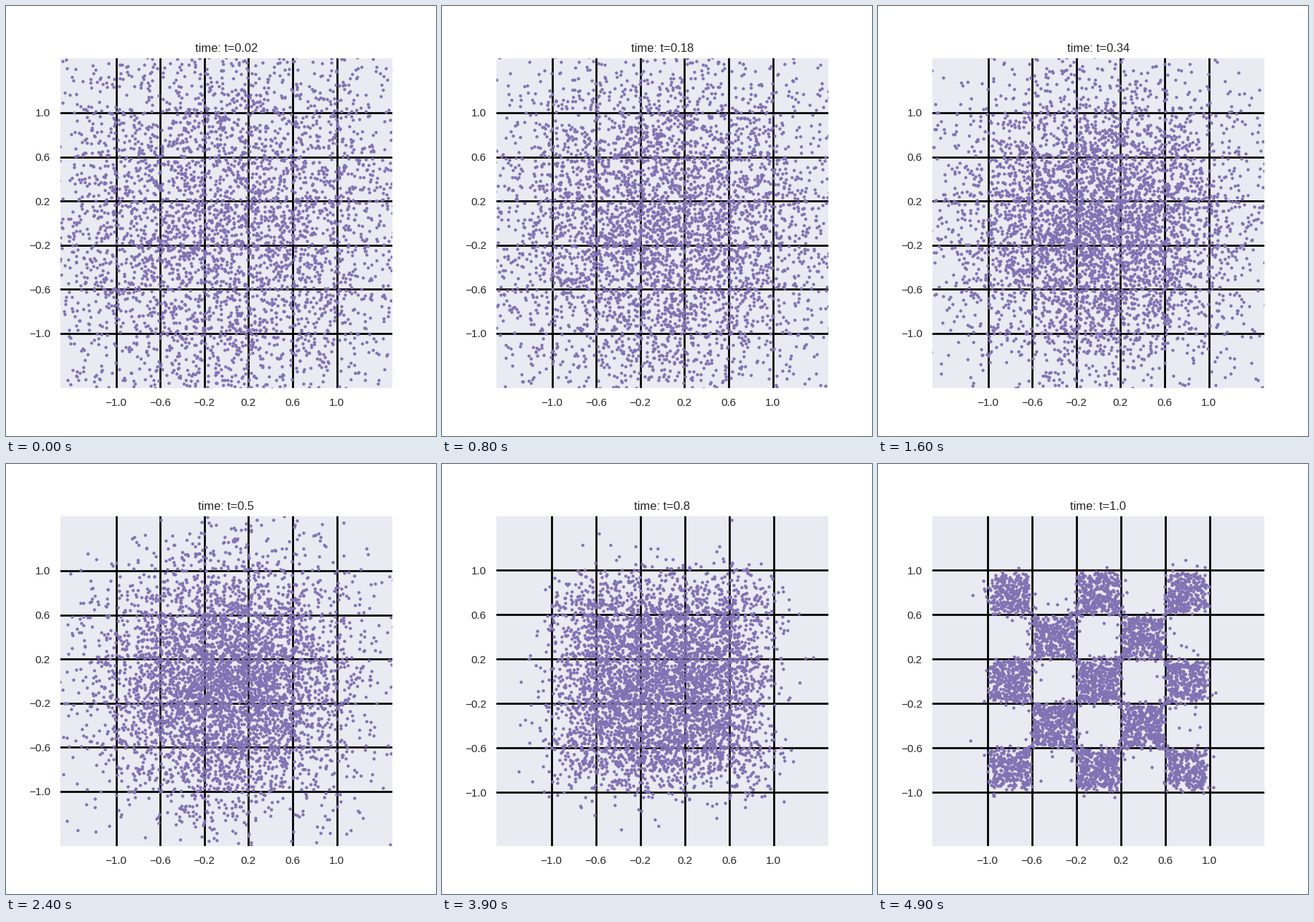
Recreate the animation shown at these times as a matplotlib script. Size 600 by 600 pixels, loop 5 s.

```python
import numpy as np
import matplotlib.pyplot as plt
from matplotlib.animation import FuncAnimation

STEPS = 50
POINTS = 5000
CELLS = 5
NODES = 16
DT = 1 / STEPS
ZOOM_STEP = 39  # the view tightens once the cloud fits inside it

plt.rcParams["font.family"] = "Liberation Sans"
plt.rcParams["text.color"] = "#262626"

edges = np.linspace(-1, 1, CELLS + 1)
# Sample positions inside each cell along one axis, shape (CELLS, NODES)
nodes = edges[:-1, None] + 0.4 * (np.arange(NODES) + 0.5) / NODES
filled = (np.add.outer(np.arange(CELLS), np.arange(CELLS)) % 2 == 0).astype(float)


def cell_moments(coord, t, sigma):
    """Weight and first moment of every cell as the destination of a point."""
    log_w = -((coord[:, None, None] - t * nodes) ** 2) / (2 * sigma**2)
    w = np.exp(log_w - log_w.max(axis=(1, 2), keepdims=True))
    return w.sum(axis=2), (w * nodes).sum(axis=2)


def expected_target(pos, t):
    """Mean checkerboard position reachable from pos at time t."""
    sigma = 1 - t + 0.015
    wx, mx = cell_moments(pos[:, 0], t, sigma)
    wy, my = cell_moments(pos[:, 1], t, sigma)
    reach_x, reach_y = wy @ filled, wx @ filled
    total = (wx * reach_x).sum(axis=1) + 1e-300
    return np.column_stack([(mx * reach_x).sum(axis=1),
                            (my * reach_y).sum(axis=1)]) / total[:, None]


def flow_path():
    """Carry Gaussian noise to the checkerboard with Euler steps."""
    rng = np.random.default_rng(7)
    pos = rng.standard_normal((POINTS, 2))
    blur = np.clip(0.013 * rng.standard_t(2, (POINTS, 2)), -0.22, 0.22)
    path = []
    for k in range(STEPS):
        t = k * DT
        pos = pos + DT * (expected_target(pos, t) - pos) / (1 - t)
        path.append(pos + blur * (t + DT) ** 8)
    return path


path = flow_path()

fig, ax = plt.subplots(figsize=(6, 6), dpi=100, facecolor="white")
ax.set_facecolor("#EAEAF2")
ax.set_axisbelow(True)
ax.grid(color="black", linewidth=2)
ax.set_xticks(edges, [f"{v:.1f}".replace("-", "\u2212") for v in edges])
ax.set_yticks(edges, [f"{v:.1f}".replace("-", "\u2212") for v in edges])
ax.tick_params(length=0, pad=9.5, labelsize=11, labelcolor="#262626")
for spine in ax.spines.values():
    spine.set(color="white", linewidth=1.25)

dots = ax.scatter(*path[0].T, s=10, color="#8172B3", linewidths=0)
title = ax.set_title("", fontsize=12)


def update(step):
    dots.set_offsets(path[step])
    title.set_text(f"time: t={round((step + 1) * DT, 2)}")
    scale = 155 if step >= ZOOM_STEP else 154  # pixels per unit
    half_x, half_y = 232.5 / scale, 231 / scale
    ax.set_xlim(-half_x, half_x)
    ax.set_ylim(-half_y, half_y)
    return dots, title


anim = FuncAnimation(fig, update, frames=STEPS, interval=100, repeat=True)
plt.show()
```
